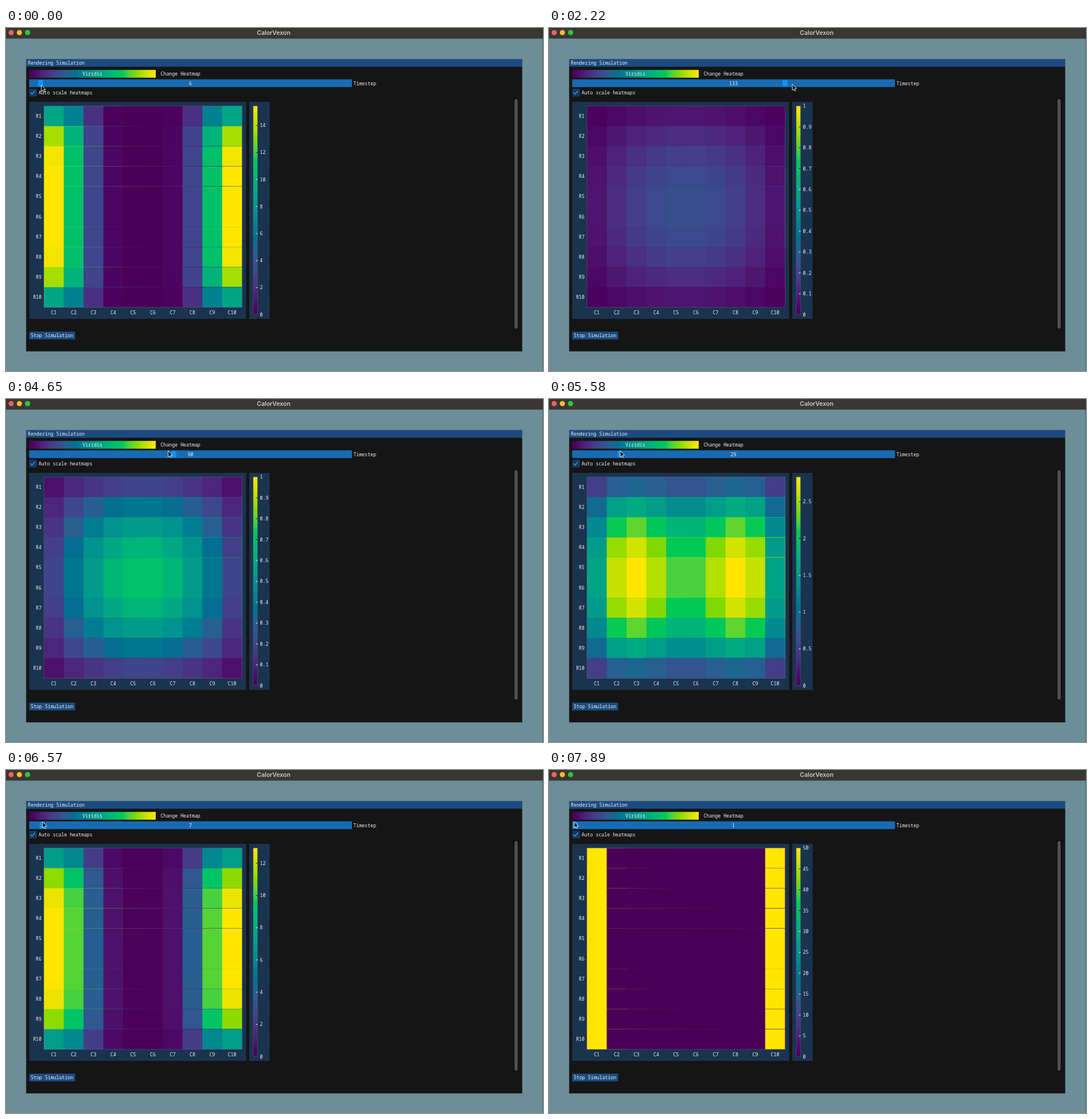
Recreate the animation shown at these times as an HTML page with a canvas. Size 936 by 599 pixels, loop 8.37 s.

```html
<!DOCTYPE html>
<html lang="en">
<head>
<meta charset="utf-8">
<title>Heat simulation</title>
<style>
html, body { margin: 0; width: 100%; height: 100%; overflow: hidden; background: #6b8e98; }
canvas { display: block; }
</style>
</head>
<body>
<canvas id="stage" width="936" height="599"></canvas>
<script>
const ctx = document.getElementById('stage').getContext('2d');
const LOOP = 8370, TICK = 30, LAG = 35, N = 10, STEPS = 200;
const MONO = '8.25px "Noto Sans Mono", "DejaVu Sans Mono", monospace';
const PANEL = '#1a334f', BUTTON = '#1c4b80', LINE = 'rgba(110,110,128,.5)';

// Frame height and the tops of the stacked controls
const LEFT = 40.4, FRAME = 13.6, rowTop = i => 73.2 + 16.43 * i;

const VIRIDIS = '440154 482475 414487 355f8d 2a788e 21918c 22a884 44bf70 7ad151 bddf26 fde725'
  .split(' ').map(hex => [0, 2, 4].map(i => parseInt(hex.slice(i, i + 2), 16)));

// Pointer drags along the slider: start ms, end ms, x reached
const START_X = 61.5;
const DRAGS = [
  [450, 510, 66], [900, 3080, 612], [3140, 5580, 124],
  [5580, 6600, 63.5], [6780, 6990, 57], [7140, 7890, 44]
];

const clamp = (v, lo, hi) => Math.min(Math.max(v, lo), hi);
const smooth = u => (u = clamp(u, 0, 1), u * u * (3 - 2 * u));

const pointerX = t => DRAGS.reduce(
  (x, [from, to, goal]) => x + (goal - x) * smooth((t - from) / (to - from)), START_X);
const pointerY = t => 100 - 9.5 * smooth((t - 1200) / 3700);

const SLOT = 2.764, SLOT_X = 46.5;
const stepAt = t => clamp(Math.round(1 + (pointerX(t - LAG) - SLOT_X) / SLOT), 1, STEPS);

// Explicit heat diffusion with cold surroundings and slight cooling.
function simulate() {
  const spread = 0.12, cooling = 0.005;
  let grid = Array.from({ length: N }, () =>
    Array.from({ length: N }, (_, c) => c === 0 || c === N - 1 ? 50 : 0));
  const history = [grid];
  while (history.length < STEPS) {
    const at = (r, c) => grid[r]?.[c] ?? 0;
    const next = grid.map((row, r) => row.map((v, c) =>
      v * (1 - 4 * spread - cooling) +
      spread * (at(r - 1, c) + at(r + 1, c) + at(r, c - 1) + at(r, c + 1))));
    history.push(next);
    grid = next;
  }
  return history;
}
const history = simulate();

// Reads a colour as Display P3 and clips it to sRGB.
function fromP3(rgb) {
  const [r, g, b] = rgb.map(v => {
    v /= 255;
    return v <= .04045 ? v / 12.92 : ((v + .055) / 1.055) ** 2.4;
  });
  return [
    1.2249 * r - .2249 * g,
    1.042 * g - .042 * r,
    1.0983 * b - .0786 * g - .0196 * r
  ].map(v => {
    v = clamp(v, 0, 1);
    return Math.round(255 * (v <= .0031308 ? v * 12.92 : 1.055 * v ** (1 / 2.4) - .055));
  });
}

function heatColor(f) {
  const p = clamp(f, 0, 1) * (VIRIDIS.length - 1);
  const i = Math.min(Math.floor(p), VIRIDIS.length - 2);
  return `rgb(${fromP3(VIRIDIS[i].map((a, k) => a + (VIRIDIS[i + 1][k] - a) * (p - i)))})`;
}

function heatGradient(x0, y0, x1, y1) {
  const g = ctx.createLinearGradient(x0, y0, x1, y1);
  for (let f = 0; f <= 50; f++) g.addColorStop(f / 50, heatColor(f / 50));
  return g;
}

function rect(x0, y0, x1, y1, fill) {
  ctx.fillStyle = fill;
  ctx.fillRect(x0, y0, x1 - x0, y1 - y0);
}

function outline(x0, y0, x1, y1) {
  ctx.strokeStyle = LINE;
  ctx.lineWidth = .8;
  ctx.strokeRect(x0, y0, x1 - x0, y1 - y0);
}

function text(s, x, y, align = 'left', fill = '#f2f2f2', font = MONO) {
  ctx.font = font;
  ctx.textAlign = align;
  ctx.fillStyle = fill;
  ctx.fillText(s, x, y + 3);
}

function path(points, close) {
  ctx.beginPath();
  points.forEach(([x, y]) => ctx.lineTo(x, y));
  if (close) ctx.closePath();
}

function drawWindow() {
  rect(0, 0, 936, 599, '#6b8e98');
  rect(935, 18, 936, 599, '#4d666e');
  rect(0, 0, 936, 18.5, '#393734');
  ['#ff5f57', '#febc2e', '#28c840'].forEach((c, i) => {
    ctx.fillStyle = c;
    ctx.beginPath();
    ctx.arc(9 + 14.3 * i, 8, 4.5, 0, 7);
    ctx.fill();
  });
  text('CalorVexon', 466.5, 8.5, 'center', '#cbc9c7', '600 10.5px Inter, sans-serif');

  rect(35, 54, 900, 565, '#151515');
  rect(35, 54, 900, 54 + FRAME, BUTTON);
  outline(35, 54.3, 899.7, 564.7);
  text('Rendering Simulation', 38, 61);

  rect(LEFT, rowTop(0), 261, rowTop(0) + FRAME, heatGradient(LEFT, 0, 261, 0));
  text('Viridis', 150.5, 80, 'center');
  text('Change Heatmap', 269.5, 80);
  text('Timestep', 605.5, 96.5);

  rect(LEFT, rowTop(2), LEFT + FRAME, rowTop(2) + FRAME, '#193858');
  path([[42.5, 112.5], [45.3, 115.5], [50.8, 109.5]]);
  ctx.strokeStyle = '#2a90f2';
  ctx.lineWidth = 1.7;
  ctx.stroke();
  text('Auto scale heatmaps', 56.7, 113);

  rect(885, 123, 893, 526, '#0c0c0c');
  ctx.fillStyle = '#505050';
  ctx.beginPath();
  ctx.roundRect(886.3, 124, 5.6, 401, 2.8);
  ctx.fill();
  rect(LEFT, 530.2, 120.5, 530.2 + FRAME, BUTTON);
  text('Stop Simulation', 43, 537);
}

function drawSlider(step) {
  const x = SLOT_X + (step - 1) * SLOT, y = rowTop(1);
  rect(LEFT, y, 603, y + FRAME, '#176bb3');
  rect(x - 4.3, y + 1.4, x + 4.3, y + FRAME - 1.4, '#0d93fa');
  text(step, 321.5, 96.5, 'center');
}

function drawHeatmap(grid, top) {
  const x0 = 66.1, y0 = 136.2, x1 = 411.3, y1 = 487.8;
  const w = (x1 - x0) / N, h = (y1 - y0) / N;
  rect(LEFT, 129, 418.5, 508, PANEL);
  // Each cell runs to the far corner; later cells cover the surplus.
  grid.forEach((row, r) => row.forEach((v, c) =>
    rect(x0 + c * w, y0 + r * h, x1, y1, heatColor(v / top))));
  outline(x0, y0, x1, y1);
  for (let i = 0; i < N; i++) {
    text('R' + (i + 1), 62, y0 + (i + .5) * h, 'right');
    text('C' + (i + 1), x0 + (i + .5) * w, 496.5, 'center');
  }
}

function niceCeil(v) {
  const base = 10 ** Math.floor(Math.log10(v)), f = v / base;
  return base * (f <= 1 ? 1 : f <= 2 ? 2 : f <= 5 ? 5 : 10);
}

function drawScale(top) {
  const y0 = 136.2, y1 = 500.6, gap = niceCeil(top * .99) / 10;
  rect(424, 129, 459.5, 508, PANEL);
  rect(431, y0, 438.3, y1, heatGradient(0, y1, 0, y0));
  outline(431, y0, 438.3, y1);
  for (let i = 0; i * gap <= top + 1e-9; i++) {
    const f = i * gap / top, y = y1 - f * (y1 - y0);
    if (f > 0 && f < 1) rect(435.5, y - .5, 438.5, y + .5, f < .68 ? '#f2f2f2' : '#182018');
    text(+(i * gap).toPrecision(6), 442.5, y);
  }
}

function drawPointer(x, y) {
  path([[0, 0], [0, 10.5], [2.4, 8.3], [4, 12], [5.7, 11.2], [4.2, 7.7], [7.4, 7.4]]
    .map(([dx, dy]) => [x + dx, y + dy]), true);
  ctx.fillStyle = '#000';
  ctx.fill();
  ctx.strokeStyle = '#fff';
  ctx.lineWidth = .9;
  ctx.stroke();
}

const start = performance.now();
function draw() {
  const t = Math.floor((performance.now() - start) % LOOP / TICK) * TICK;
  const step = stepAt(t), grid = history[step - 1];
  const top = Math.max(1, ...grid.flat());
  drawWindow();
  drawSlider(step);
  drawHeatmap(grid, top);
  drawScale(top);
  drawPointer(pointerX(t), pointerY(t));
  requestAnimationFrame(draw);
}
draw();
</script>
</body>
</html>
```
